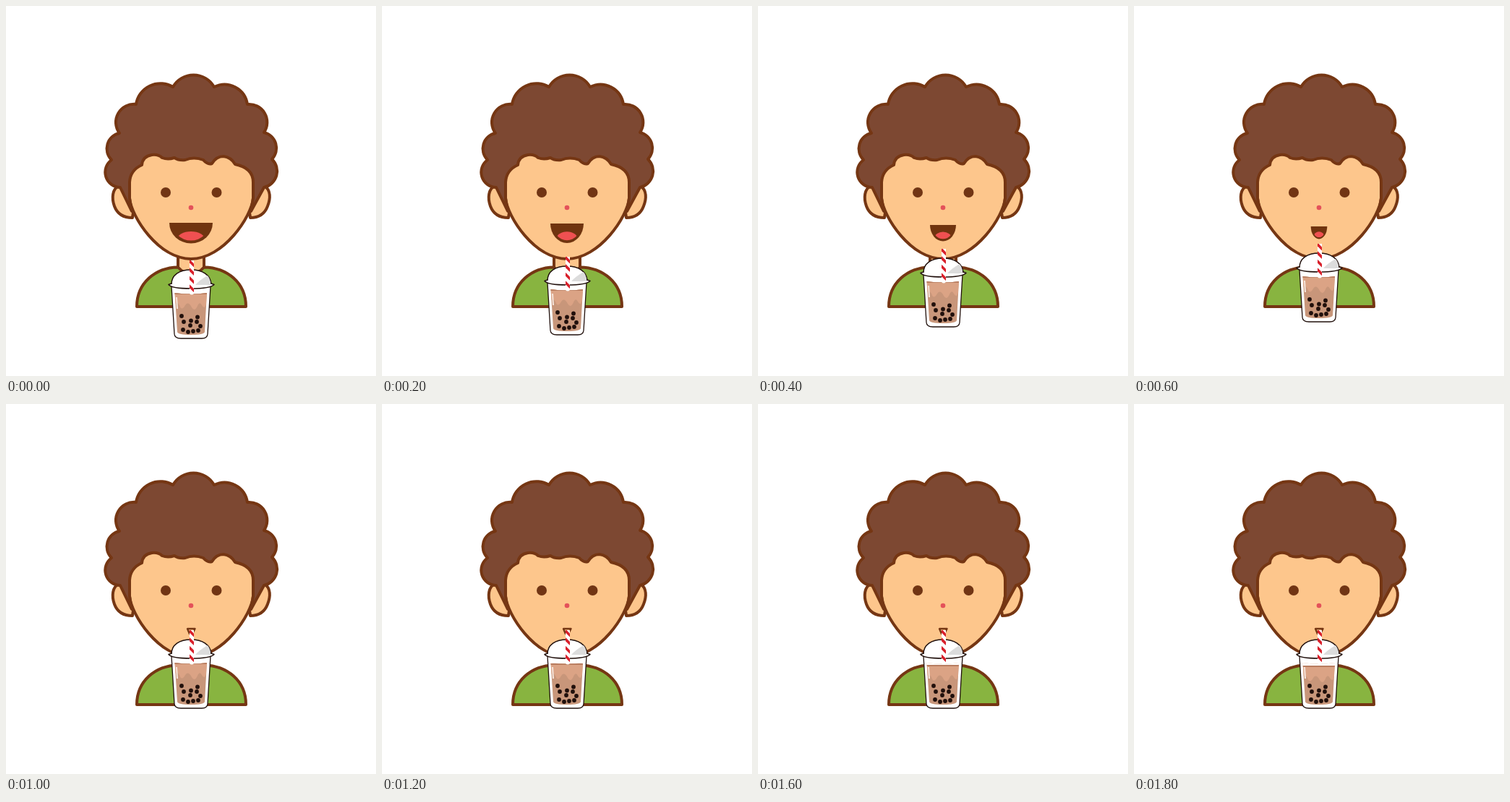
Animation, 512 px wide and 512 px high, one loop 2000 ms. Source, as an HTML page with a canvas:

```html
<!DOCTYPE html>
<html lang="en">
<head>
<meta charset="utf-8">
<title>Bubble tea</title>
<style>
html, body { margin: 0; width: 100%; height: 100%; overflow: hidden; background: #fff; }
canvas { display: block; width: 100vmin; height: 100vmin; }
</style>
</head>
<body>
<canvas id="stage" width="512" height="512"></canvas>
<script>
const ctx = document.getElementById('stage').getContext('2d');
const STEP = 200, STEPS = 10;
const LINE = '#753613', HAIR = '#7d4832', SKIN = '#fdc68c', SHIRT = '#88b440', INK = '#21100c';

// One entry per pose; the last one is held while the drink goes down.
const poses = [
  { lift: 0, half: 30, top: 300, bottom: 328.5 },
  { lift: 5, half: 23, top: 301, bottom: 328 },
  { lift: 16, half: 18, top: 303, bottom: 325.5 },
  { lift: 23, half: 11.3, top: 305, bottom: 322.5 },
  { lift: 30, half: 7.5, top: 308, bottom: 321 },
  { lift: 39, half: 6.5, top: 310, bottom: 320 }
];

const shapes = {
  leftEar: 'M156 249C147 253 146 266 150 277Q156 293 175 293L180 255Z',
  rightEar: 'M357 249C367 254 366 267 362 277Q356 293 338 293L333 255Z',
  neck: 'M238 338V370Q256 382 274 370V338Z',
  shirt: 'M181 416C181 383 207 362 238 361.5Q256 381 274 361.5C306 362 332 383 332 416Z',
  face: 'M171 266C173 291 211 350 256 350C301 350 340 291 342 266V202H171Z',
  hair: 'M158 251A21 21 0 0 1 146 213A21.9 21.9 0 0 1 157 176' +
    'A25.1 25.1 0 0 1 180 136A34 34 0 0 1 231 112A32.8 32.8 0 0 1 288 112' +
    'A32 32 0 0 1 334 136A25 25 0 0 1 357 175A22.2 22.2 0 0 1 368 212' +
    'A22.9 22.9 0 0 1 357 251L339 284L342 266V244Q342 224 317 219' +
    'Q311 209 301 208Q291 208 285 218Q279 220 273 213Q260 208 248 213' +
    'Q239 214 233 210Q224 213 216 210Q211 205 202 206Q189 208 188 220' +
    'Q172 227 171 244V266L174 284Z',
  dome: 'M229 385C229 372 240 365 256 365C272 365 283 372 284 385',
  domeShade: 'M262 386Q268 379 279 373Q283 378 283 386Z',
  cup: 'M229 388L233 454Q233.5 460 242 460H271Q278.5 460 279 454L283 388Z',
  lid: 'M229 384L225 385.5Q229 391 256 391Q283 391 288 385.5L284 384Z',
  rim: 'M229 384L225 385.5Q229 391 256 391Q283 391 288 385.5L284 384',
  drink: 'M233.5 397Q256 400 278 397L275 451Q274 455 256 455Q238 455 237 451Z',
  drips: 'M233 390H279L277 412Q275 421 271 414Q268 408 265 415Q261 424 257 417' +
    'Q252 408 248 414Q243 423 240 414Q237 408 234 412Z',
  glint: 'M236 403L237 419'
};
for (const name in shapes) shapes[name] = new Path2D(shapes[name]);

const pearls = [
  [243, 429], [265, 430.5], [246, 437], [256, 435.5], [264, 437],
  [255, 442], [269, 443], [245, 448], [252, 451], [259, 450], [266, 449]
];

function paint(path, fill, stroke, width) {
  if (fill) { ctx.fillStyle = fill; ctx.fill(path); }
  if (stroke) { ctx.strokeStyle = stroke; ctx.lineWidth = width; ctx.stroke(path); }
}

function dot(x, y, r, color) {
  ctx.fillStyle = color;
  ctx.beginPath();
  ctx.arc(x, y, r, 0, Math.PI * 2);
  ctx.fill();
}

function clipped(path, draw) {
  ctx.save();
  ctx.clip(path);
  draw();
  ctx.restore();
}

function drawBoy() {
  paint(shapes.leftEar, SKIN, LINE, 4);
  paint(shapes.rightEar, SKIN, LINE, 4);
  paint(shapes.neck, SKIN, LINE, 4);
  paint(shapes.shirt, SHIRT, LINE, 4);
  paint(shapes.face, SKIN, LINE, 4);
  paint(shapes.hair, HAIR, LINE, 4);
  dot(221, 258, 7, '#713514');
  dot(291.5, 258, 7, '#713514');
  dot(256, 279, 3.3, '#e4525a');
}

function bowl(half, top, bottom) {
  const path = new Path2D();
  path.ellipse(256, top, half, bottom - top, 0, 0, Math.PI);
  path.closePath();
  return path;
}

function drawMouth({ half, top, bottom }) {
  if (half < 7) {
    paint(new Path2D(`M251 ${top + 1}H261.5L258 ${bottom - 2}H254Z`), SKIN, LINE, 2.4);
    return;
  }
  const depth = bottom - top;
  paint(bowl(half, top, bottom), '#70340f');
  clipped(bowl(half * 0.86, top, bottom - depth * 0.14), () => {
    const tongue = new Path2D();
    tongue.ellipse(256, top + depth * 0.8, half * 0.64, depth * 0.38, 0, 0, Math.PI * 2);
    paint(tongue, '#ef5051');
  });
}

function drawStraw() {
  const tube = new Path2D('M254 352H260V398Q257 401 254 398Z');
  paint(tube, '#fff');
  clipped(tube, () => {
    for (let y = 353; y < 395; y += 11.6) {
      paint(new Path2D(`M253 ${y - 1}L261 ${y + 7}`), null, '#d81f2a', 3.6);
    }
  });
}

function drawTea(lift, drop) {
  ctx.save();
  ctx.translate(0, -lift);
  paint(shapes.cup, '#fff', INK, 1.3);
  clipped(shapes.drink, () => {
    ctx.fillStyle = '#c8967a';
    ctx.fillRect(230, 397 + drop, 52, 60);
    ctx.save();
    ctx.translate(0, drop);
    paint(shapes.drips, '#dba385');
    ctx.restore();
    ctx.fillStyle = '#fff';
    ctx.fillRect(230, 390, 52, 7 + drop);
    ctx.fillStyle = '#b87d60';
    ctx.fillRect(230, 397 + drop, 52, 2);
  });
  paint(shapes.glint, null, '#f5e4da', 2);
  pearls.forEach(([x, y]) => dot(x, y, 2.9, INK));
  paint(shapes.lid, '#fff');
  paint(shapes.dome, '#fff', INK, 1.5);
  paint(shapes.domeShade, '#dcdcdc');
  paint(shapes.rim, null, INK, 1.5);
  drawStraw();
  ctx.restore();
}

function render(time) {
  const step = Math.floor(time / STEP) % STEPS;
  const pose = poses[Math.min(step, poses.length - 1)];
  ctx.fillStyle = '#fff';
  ctx.fillRect(0, 0, 512, 512);
  ctx.lineJoin = 'round';
  drawBoy();
  drawMouth(pose);
  drawTea(pose.lift, Math.max(0, step - 5));
}

const start = performance.now();
function tick() {
  render(performance.now() - start);
  requestAnimationFrame(tick);
}
tick();
</script>
</body>
</html>
```
